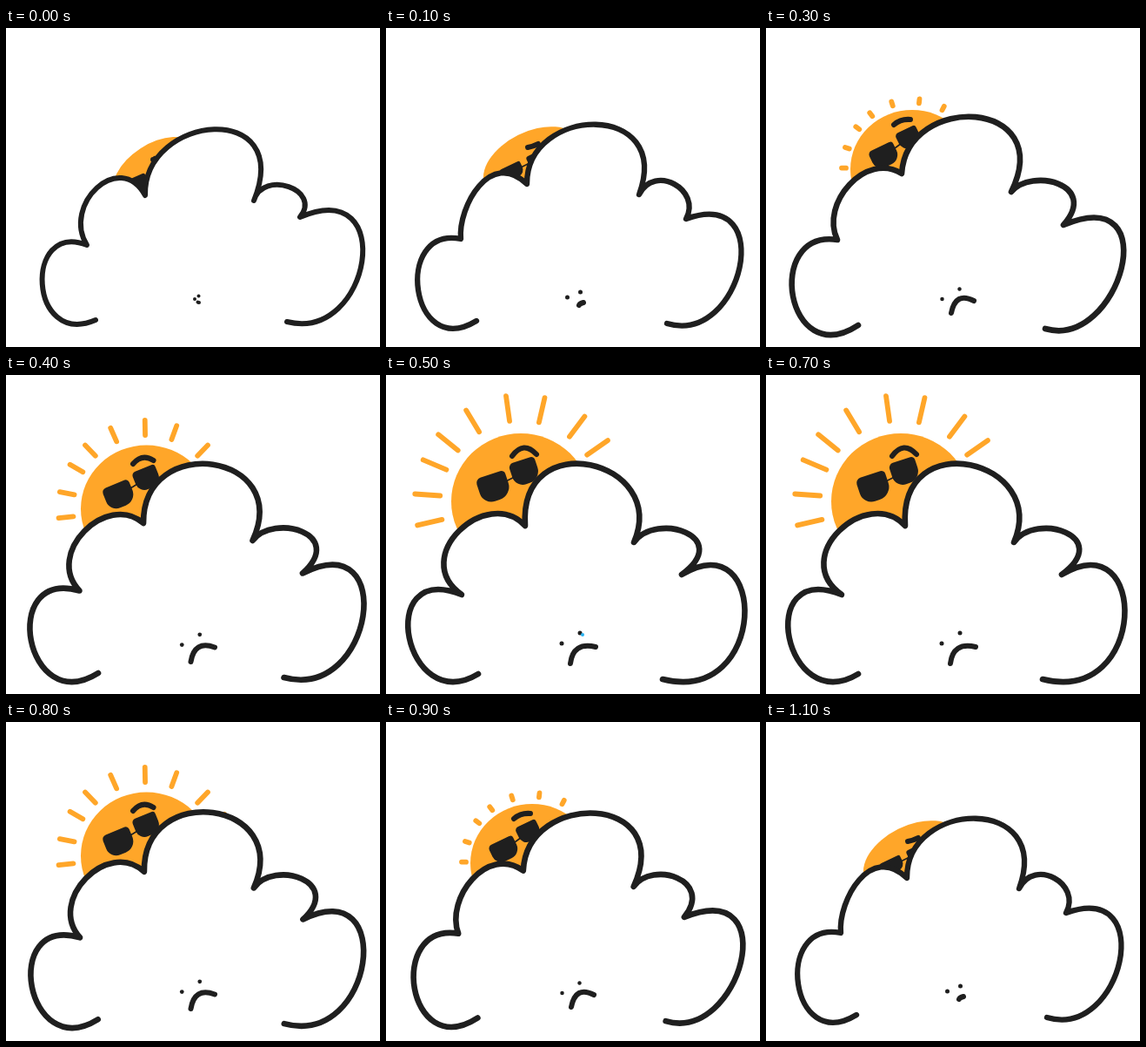
Write an HTML page with a canvas that moves like this. It is 430x366 px and loops after 1210 ms.

```html
<!DOCTYPE html>
<html lang="en">
<head>
<meta charset="utf-8">
<title>Sun behind a cloud</title>
<style>
  html, body { margin: 0; width: 100%; height: 100%; overflow: hidden; background: #fff; }
  canvas { display: block; width: 430px; height: 366px; }
</style>
</head>
<body>
<canvas id="stage" width="430" height="366"></canvas>
<script>
const ctx = document.getElementById('stage').getContext('2d');
const INK = '#1f1f1f', ORANGE = '#ffa629', BLUE = '#2bb3f0';
const LOOP = 1210, STEP = 100;
const RAY_ANGLES = [167, 184, 203, 219, 239, 262, 283, 307, 325];

// Key poses.
// cloud: per lobe two points a third of the way along, then its closing cusp
// sun: x, y, rx, ry, tilt    rays: inner radius, outer radius, turn in degrees
// lenses: x, y, half width, half height    brow, mouth: start, control, end
const low = {
  cloud: {
    start: [103, 335],
    lobes: [
      [50,321, 46,266, 93,249], [91,202, 123,173, 160,192], [202,126, 273,124, 285,198],
      [309,180, 338,190, 338,217], [406,232, 395,306, 323,337]
    ]
  },
  sun: [172, 165, 54.6, 32, -.576], rays: [0, 0, 14],
  lenses: [[154,177, 9, 8], [172,170, 7, 10]], tilt: -.4,
  brow: [169,151, 170,151, 171,150],
  eyes: [[217, 311], [221.5, 307.5]], mouth: [220.5,314.5, 221,315, 222,315],
  line: 6, eyeLine: 4, mouthLine: 4
};
const peek = {
  cloud: {
    start: [104, 336],
    lobes: [
      [48,329, 39,270, 86,242], [95,200, 123,169, 162,179], [204,118, 275,120, 291,191],
      [317,175, 343,189, 345,219], [406,239, 391,311, 323,339]
    ]
  },
  sun: [168, 155, 60, 36, -.46], rays: [0, 0, 14],
  lenses: [[145,165, 13, 8], [171,152, 8, 8]], tilt: -.45,
  brow: [163,137, 169,136, 175,133],
  eyes: [[208.5, 309], [223.5, 303]], mouth: [222,318, 223,316, 227,315],
  line: 6.3, eyeLine: 5, mouthLine: 6
};
const rise = {
  cloud: {
    start: [106, 341],
    lobes: [
      [44,337, 32,275, 82,243], [83,199, 114,166, 156,167], [203,107, 274,114, 282,188],
      [317,175, 350,189, 342,226], [409,240, 391,314, 321,345]
    ]
  },
  sun: [168, 162, 71, 68, 0], rays: [76, 81, 14],
  lenses: [[136,147, 15.5, 12], [164,126, 13, 10.5]], tilt: -.45,
  brow: [147,111, 155,104, 166,105],
  eyes: [[202.5, 311], [222.5, 299.5]], mouth: [213,327, 218,302, 239,313],
  line: 6.6, eyeLine: 4.5, mouthLine: 6
};
const high = {
  cloud: {
    start: [106, 343],
    lobes: [
      [41,333, 28,269, 87,252], [69,202, 108,163, 160,173], [198,105, 269,119, 285,192],
      [324,176, 358,192, 340,229], [406,240, 400,318, 318,349]
    ]
  },
  sun: [155, 145, 80, 78, 0], rays: [93, 122, 0],
  lenses: [[124,129, 17.5, 15.5], [159.5,111, 15.5, 14]], tilt: -.32,
  brow: [145,93, 158,75, 173,91],
  eyes: [[202, 308], [223, 296]], mouth: [212,331, 215,306, 241,312],
  line: 6.6, eyeLine: 5, mouthLine: 6
};

function mix(a, b, t) {
  if (typeof a === 'number') return a + (b - a) * t;
  if (Array.isArray(a)) return a.map((v, i) => mix(v, b[i], t));
  return Object.fromEntries(Object.keys(a).map(k => [k, mix(a[k], b[k], t)]));
}

// On the way down the cloud keeps a little of its lower shape.
const fall = { ...rise, cloud: mix(peek.cloud, rise.cloud, .7) };
const poses = [
  low, peek, mix(peek, rise, .5), rise, mix(rise, high, .5),
  { ...high, tear: [226, 298] },
  { ...mix(rise, high, 1.25), tear: [227, 300] },
  high, mix(fall, high, .5), fall, mix(peek, fall, .5), peek
];

function stroke(color, width) {
  ctx.strokeStyle = color;
  ctx.lineWidth = width;
  ctx.stroke();
}

function bend([x, y, ...rest], width) {
  ctx.beginPath();
  ctx.moveTo(x, y);
  ctx.quadraticCurveTo(...rest);
  stroke(INK, width);
}

function dot([x, y], size, color) {
  ctx.beginPath();
  ctx.arc(x, y, size / 2, 0, 2 * Math.PI);
  ctx.fillStyle = color;
  ctx.fill();
}

function drawRays([x, y], [inner, outer, turn]) {
  ctx.beginPath();
  for (const angle of RAY_ANGLES) {
    const a = (angle + turn) * Math.PI / 180;
    ctx.moveTo(x + inner * Math.cos(a), y + inner * Math.sin(a));
    ctx.lineTo(x + outer * Math.cos(a), y + outer * Math.sin(a));
  }
  stroke(ORANGE, 5.8);
}

function drawLens([x, y, w, h], tilt) {
  ctx.save();
  ctx.translate(x, y);
  ctx.rotate(tilt);
  ctx.beginPath();
  ctx.roundRect(-w, -h, 2 * w, 2 * h, [h * .4, h * .3, h, h * .9]);
  ctx.fillStyle = INK;
  ctx.fill();
  ctx.restore();
}

function drawSun({ sun, rays, brow, lenses, tilt }) {
  drawRays(sun, rays);
  ctx.beginPath();
  ctx.ellipse(...sun, 0, 2 * Math.PI);
  ctx.fillStyle = ORANGE;
  ctx.fill();
  bend(brow, 6);
  ctx.beginPath();
  lenses.forEach(([x, y]) => ctx.lineTo(x, y));
  stroke(INK, 1.6);
  lenses.forEach(lens => drawLens(lens, tilt));
}

// Cubic from (x0, y0) through q at 1/3 and r at 2/3 to the end point.
function lobeTo(x0, y0, [qx, qy, rx, ry, x, y]) {
  const handle = (a, q, r, b) => (-5 * a + 18 * q - 9 * r + 2 * b) / 6;
  ctx.bezierCurveTo(handle(x0, qx, rx, x), handle(y0, qy, ry, y),
                    handle(x, rx, qx, x0), handle(y, ry, qy, y0), x, y);
}

function drawCloud({ cloud, line, eyes, eyeLine, mouth, mouthLine, tear }) {
  let [x, y] = cloud.start;
  ctx.beginPath();
  ctx.moveTo(x, y);
  for (const lobe of cloud.lobes) {
    lobeTo(x, y, lobe);
    [x, y] = lobe.slice(4);
  }
  ctx.fillStyle = '#fff';
  ctx.fill();
  stroke(INK, line);
  eyes.forEach(eye => dot(eye, eyeLine, INK));
  bend(mouth, mouthLine);
  if (tear) dot(tear, 4, BLUE);
}

function draw(now) {
  const step = Math.min(poses.length - 1, Math.floor(now % LOOP / STEP));
  ctx.fillStyle = '#fff';
  ctx.fillRect(0, 0, 430, 366);
  drawSun(poses[step]);
  drawCloud(poses[step]);
}

function tick(now) {
  draw(now);
  requestAnimationFrame(tick);
}

ctx.lineCap = ctx.lineJoin = 'round';
draw(0);
requestAnimationFrame(tick);
</script>
</body>
</html>
```
